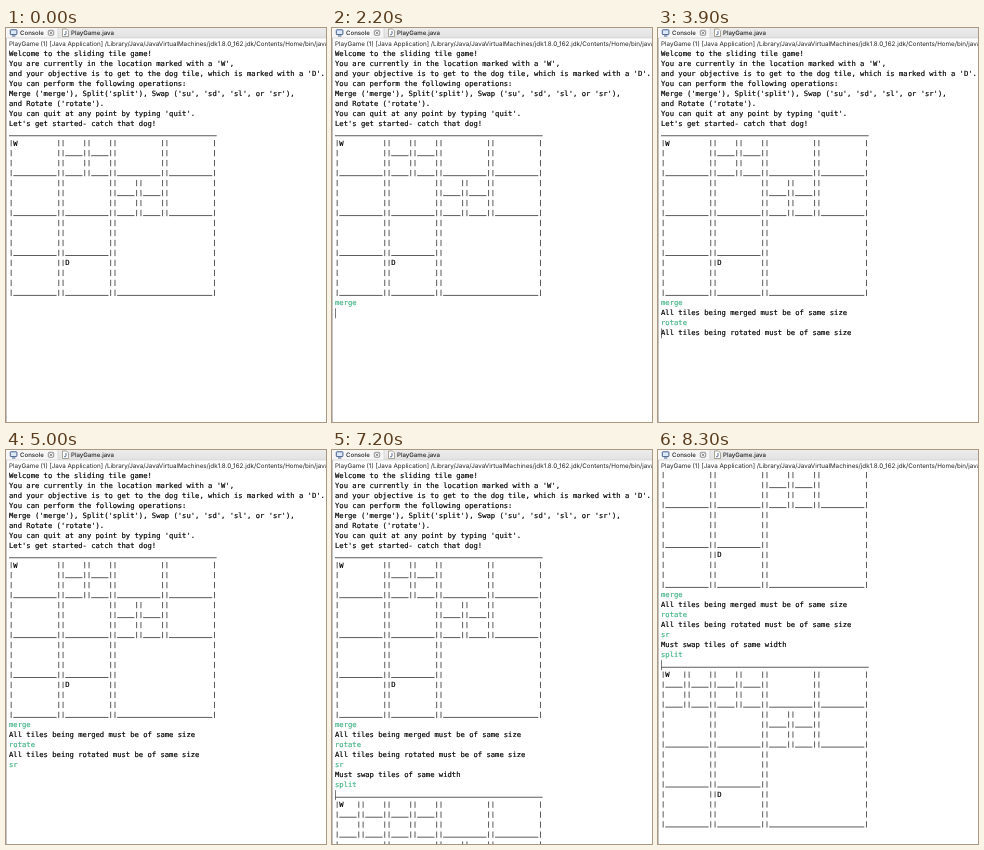
An HTML page for the animation above (8.4 s loop, 320 by 394 pixels).

```html
<!DOCTYPE html>
<html lang="en">
<head>
<meta charset="utf-8">
<title>Sliding tile game</title>
<style>
  html, body { margin: 0; width: 100%; height: 100%; overflow: hidden; background: #fff; }
  svg { display: block; width: 320px; height: 394px; }
  text { white-space: pre; text-rendering: geometricPrecision; }
  .ui { font-family: Inter, Roboto, sans-serif; fill: #222; }
  .tab { font-size: 6.1px; font-weight: 500; }
  .mono { font-family: "DejaVu Sans Mono", monospace; font-size: 7.19px; fill: #000; stroke: #000; stroke-width: .18; }
  .mono .in { fill: #45b487; stroke: #45b487; }
  .mono .grid { fill: none; stroke: #333; stroke-width: .8; }
  .mono .caret { fill: #444; stroke: none; }
</style>
</head>
<body>
<svg viewBox="0 0 320 394">
  <defs>
    <linearGradient id="bar" x2="0" y2="1">
      <stop offset="0" stop-color="#ececec"/>
      <stop offset="1" stop-color="#e2e2e2"/>
    </linearGradient>
    <clipPath id="view"><rect y="20.5" width="320" height="374"/></clipPath>
  </defs>
  <rect width="320" height="394" fill="#fff"/>
  <g clip-path="url(#view)"><g id="page" class="mono"></g></g>
  <rect width="320" height="10" fill="url(#bar)"/>
  <path d="M0 0H52V10H0Z" fill="#f6f6f6"/>
  <path d="M52 0V10M0 10H320" stroke="#cfcfcf" stroke-width=".7"/>
  <path d="M.5 10V394" stroke="#c4c4c4"/>
  <rect x="4.3" y="1.8" width="6.6" height="4.8" rx=".6" fill="#dce9f8" stroke="#48628c"/>
  <path d="M6 8H9.4" stroke="#48628c"/>
  <rect x="42.3" y="2.3" width="5.4" height="5" rx="1" fill="#fff" stroke="#666" stroke-width=".7"/>
  <path d="M43.5 3.3L46.5 6.3M46.5 3.3L43.5 6.3" stroke="#666" stroke-width=".8"/>
  <path d="M56.5 1H60.5L62.5 3V8.5H56.5Z" fill="#fff" stroke="#8a8270" stroke-width=".7"/>
  <path d="M60 3V6Q60 7.2 58 6.7" fill="none" stroke="#48628c" stroke-width=".9"/>
  <text class="ui tab" x="14" y="7">Console</text>
  <text class="ui tab" x="65" y="7">PlayGame.java</text>
  <text class="ui" x="3" y="18" font-size="6.27">PlayGame (1) [Java Application] /Library/Java/JavaVirtualMachines/jdk1.8.0_162.jdk/Contents/Home/bin/java</text>
</svg>
<script>
const LOOP = 8400, LEFT = 3, BASE = 27.7, PITCH = 9.98, CHAR = 4.326;
const NS = "http://www.w3.org/2000/svg";
const page = document.getElementById("page");

function add(tag, attrs, text = "") {
  const el = document.createElementNS(NS, tag);
  for (const key in attrs) el.setAttribute(key, attrs[key]);
  el.textContent = text;
  return page.appendChild(el);
}

const colX = col => LEFT + col * CHAR;
const rowY = row => BASE + row * PITCH;
const show = (el, on) => el.setAttribute("visibility", on ? "visible" : "hidden");

let count = 0;
const line = (text, cls = "") => add("text", { x: LEFT, y: rowY(count++), class: cls }, text);

// Tiles sit on an 8 x 8 grid; each unit is 6 characters wide and 2 lines high.
function board(split) {
  const top = count, parts = [];
  let d = "";
  const rule = (row, from, to) => d += `M${colX(from)} ${rowY(row) + 0.2}H${colX(to)}`;
  const bar = (row, col) => d += `M${colX(col + 0.5)} ${rowY(row) - 5.5}v6.3`;
  const tile = (x, y, size, mark) => {
    const l = x * 6, r = l + size * 6 - 1, first = top + 1 + y * 2, last = first + size * 2 - 1;
    for (let row = first; row <= last; row++) {
      bar(row, l);
      bar(row, r);
    }
    rule(last, l + 1, r);
    if (mark) parts.push(add("text", { x: colX(l + 1), y: rowY(first) }, mark));
  };
  const quad = (x, y, mark) => {
    tile(x, y, 1, mark);
    tile(x + 1, y, 1);
    tile(x, y + 1, 1);
    tile(x + 1, y + 1, 1);
  };
  rule(top, 0, 48);
  if (split) quad(0, 0, "W");
  else tile(0, 0, 2, "W");
  quad(2, 0);
  quad(4, 2);
  [[4, 0], [6, 0], [0, 2], [2, 2], [6, 2], [0, 4], [2, 4], [0, 6]].forEach(([x, y]) => tile(x, y, 2));
  tile(2, 6, 2, "D");
  tile(4, 4, 4);
  parts.push(add("path", { d, class: "grid" }));
  count += 17;
  return parts;
}

const intro = [
  "Welcome to the sliding tile game!",
  "You are currently in the location marked with a 'W',",
  "and your objective is to get to the dog tile, which is marked with a 'D'.",
  "You can perform the following operations:",
  "Merge ('merge'), Split('split'), Swap ('su', 'sd', 'sl', or 'sr'),",
  "and Rotate ('rotate').",
  "You can quit at any point by typing 'quit'.",
  "Let's get started- catch that dog!"
];

// keys: time of each typed letter; enter: caret moves on; reply: output appears
const turns = [
  { word: "merge", keys: [1500, 1600, 1700, 2000, 2000], enter: 2200, reply: 2300,
    out: "All tiles being merged must be of same size" },
  { word: "rotate", keys: [3000, 3100, 3200, 3400, 3500, 3600], enter: 3800, reply: 3900,
    out: "All tiles being rotated must be of same size" },
  { word: "sr", keys: [4500, 4600], enter: 5200, reply: 5300,
    out: "Must swap tiles of same width" },
  { word: "split", keys: [6000, 6700, 6800, 6900, 7000], enter: 7200, reply: 7200 }
];

const caretOff = [[0, 1100], [2900, 3000], [4400, 4500], [5000, 5200], [5800, 6000], [6400, 6700], [7800, 8300]];
const SCROLL_AT = 7300, SCROLL = 130;

intro.forEach(text => line(text));
board(false);
for (const turn of turns) {
  turn.row = count;
  turn.input = line("", "in");
  turn.parts = turn.out ? [line(turn.out)] : board(true);
}
const caret = add("rect", { width: 0.7, height: 10, class: "caret" });

function draw(t) {
  let row = turns[0].row, col = 0;
  for (const turn of turns) {
    const typed = turn.keys.filter(k => k <= t).length;
    turn.input.textContent = turn.word.slice(0, typed);
    turn.parts.forEach(el => show(el, t >= turn.reply));
    if (typed) [row, col] = t >= turn.enter ? [turn.row + 1, 0] : [turn.row, typed];
  }
  caret.setAttribute("x", colX(col) + 0.1);
  caret.setAttribute("y", rowY(row) - 6.9);
  show(caret, !caretOff.some(([from, to]) => t >= from && t < to));
  page.setAttribute("transform", `translate(0 ${t >= SCROLL_AT ? -SCROLL : 0})`);
}

const start = performance.now();
function tick() {
  draw((performance.now() - start) % LOOP);
  requestAnimationFrame(tick);
}
tick();
</script>
</body>
</html>
```
